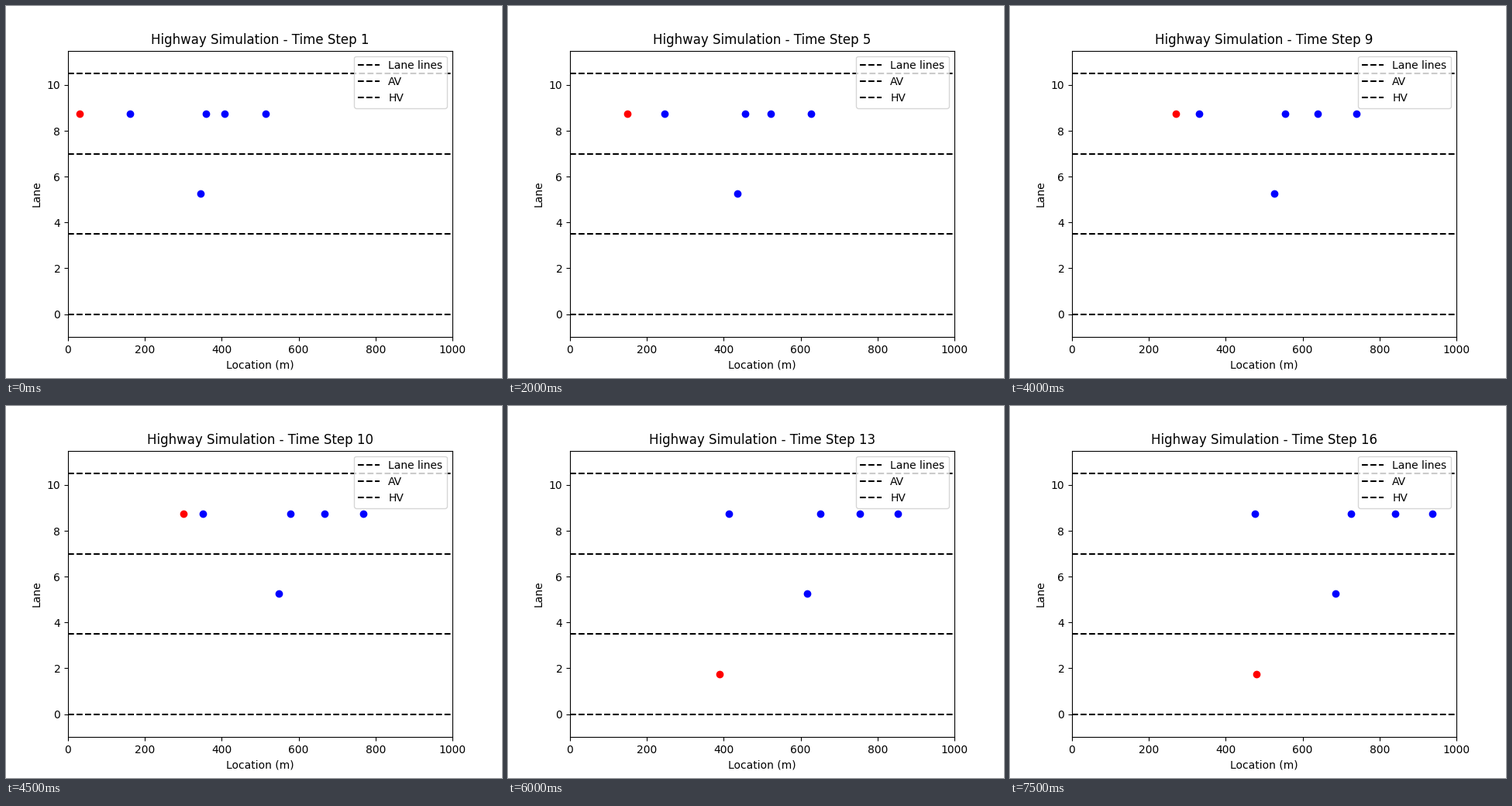
Write a matplotlib script that moves like this. It is 640 px wide and 480 px high and loops after 8000 ms.

```python
import numpy as np
import matplotlib.pyplot as plt
from matplotlib.animation import FuncAnimation

STEPS = 16
STEP_MS = 500
ROAD_LENGTH = 1000
LANES = 3
LANE_WIDTH = 3.5
AV_SPEED = 30
EXIT_STEP = 13  # the AV drops from the top lane to the bottom one

# Human drivers keep a constant speed (m per step) from their start (m).
start = np.array([161.8, 344.8, 358.2, 407.5, 514])
speed = np.array([21, 22.7, 24.45, 28.9, 28.2])
lane = np.full(len(start), LANES - 1)
lane[1] = 1


def lane_center(k):
    return (k + 0.5) * LANE_WIDTH


fig, ax = plt.subplots(figsize=(6.4, 4.8), dpi=100)
borders = [ax.axhline(k * LANE_WIDTH, color="black", linestyle="--")
           for k in range(LANES + 1)]
av, = ax.plot([], [], "ro")
humans, = ax.plot([], [], "bo")

ax.set_xlim(0, ROAD_LENGTH)
ax.set_ylim(-1, LANES * LANE_WIDTH + 1)
ax.set_xlabel("Location (m)")
ax.set_ylabel("Lane")
ax.legend(borders[:3], ["Lane lines", "AV", "HV"], loc="upper right")
title = ax.set_title("")


def update(i):
    step = i + 1
    av_lane = LANES - 1 if step < EXIT_STEP else 0
    av.set_data([AV_SPEED * step], [lane_center(av_lane)])
    humans.set_data(start + speed * i, lane_center(lane))
    title.set_text(f"Highway Simulation - Time Step {step}")
    return av, humans, title


anim = FuncAnimation(fig, update, frames=STEPS, interval=STEP_MS,
                     repeat=True, repeat_delay=0, blit=False)
plt.show()
```
